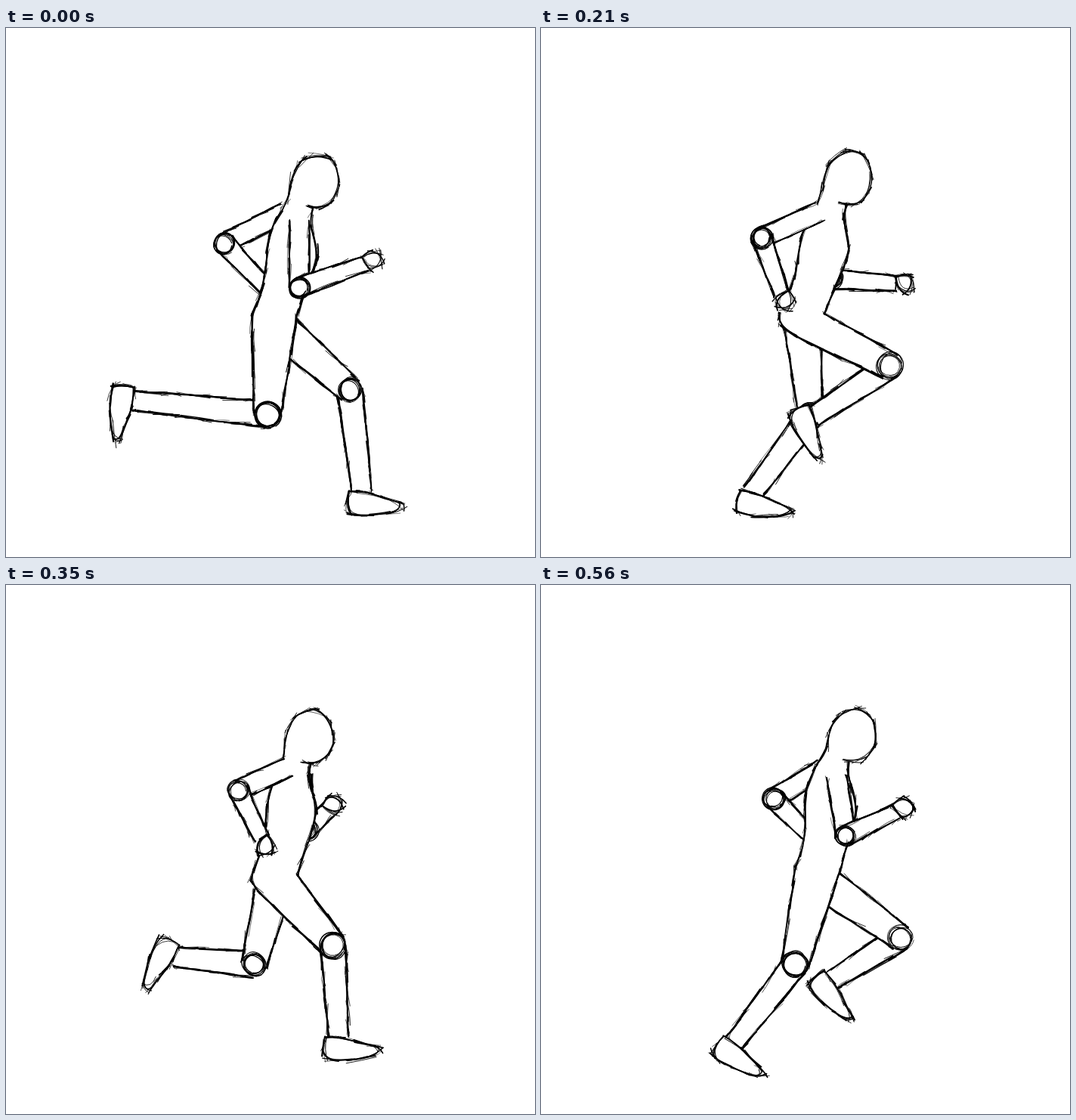
Recreate the animation shown at these times as an HTML page with a canvas. Size 700 by 700 pixels, loop 0.63 s.

```html
<!DOCTYPE html>
<html lang="en">
<head>
<meta charset="utf-8">
<title>Run cycle</title>
<style>
html, body { margin: 0; width: 100%; height: 100%; overflow: hidden; background: #fff; }
canvas { display: block; width: 700px; height: 700px; }
</style>
</head>
<body>
<canvas id="stage" width="700" height="700"></canvas>
<script>
const ctx = document.getElementById('stage').getContext('2d');
const HOLD = 70, STEPS = 9;

// Key poses: joint positions, and the tilt of each foot in degrees.
const keys = [
  { step: 0, head: [408, 200], hip: [355, 380],
    near: { elbow: [388, 343], hand: [486, 308], knee: [346, 511], ankle: [168, 493], foot: 90 },
    far: { elbow: [289, 285], hand: [360, 360], knee: [455, 479], ankle: [471, 614], foot: -2 } },
  { step: 2, head: [416, 198], hip: [346, 384],
    near: { elbow: [313, 316], hand: [357, 394], knee: [427, 497], ankle: [276, 481], foot: 84 },
    far: { elbow: [375, 335], hand: [419, 384], knee: [386, 500], ankle: [348, 613], foot: 2 } },
  { step: 3, head: [405, 195], hip: [345, 378],
    near: { elbow: [292, 278], hand: [322, 362], knee: [462, 447], ankle: [361, 514], foot: 60 },
    far: { elbow: [385, 332], hand: [481, 339], knee: [357, 512], ankle: [280, 615], foot: 5 } },
  { step: 4, head: [398, 193], hip: [358, 388],
    near: { elbow: [287, 240], hand: [298, 333], knee: [453, 466], ankle: [486, 586], foot: -10 },
    far: { elbow: [418, 320], hand: [454, 247], knee: [295, 507], ankle: [183, 542], foot: 95 } },
  { step: 6, head: [404, 202], hip: [353, 380],
    near: { elbow: [328, 303], hand: [387, 357], knee: [413, 488], ankle: [394, 612], foot: 2 },
    far: { elbow: [378, 328], hand: [413, 335], knee: [362, 497], ankle: [262, 442], foot: 123 } },
  { step: 8, head: [411, 196], hip: [366, 378],
    near: { elbow: [403, 332], hand: [480, 295], knee: [336, 502], ankle: [256, 606], foot: 27 },
    far: { elbow: [308, 283], hand: [365, 340], knee: [476, 467], ankle: [385, 523], foot: 43 } }
];

// Outlines around the origin, +x being the way the part points.
const headShape = [[-33, 22], [-31, 2], [-22, -19], [-8, -31], [8, -34], [22, -28], [30, -15],
  [32, 0], [34, 11], [27, 24], [18, 36], [8, 40], [-10, 36]];
const handShape = [[-12, -9], [-2, -14], [12, -11], [14, 3], [8, 13], [-8, 12], [-12, -9]];
const footShape = [[-17, -2], [-22, 26], [5, 31], [30, 29], [54, 26], [58, 18], [30, 10], [12, 2], [-17, -2]];

let seed = 1;
function rand(a, b) {
  seed = (Math.imul(seed, 1664525) + 1013904223) >>> 0;
  return a + (b - a) * seed / 4294967296;
}

function mix(a, b, t) {
  if (typeof a === 'number') return a + (b - a) * t;
  if (Array.isArray(a)) return a.map((v, i) => mix(v, b[i], t));
  return Object.fromEntries(Object.keys(a).map(k => [k, mix(a[k], b[k], t)]));
}
const add = (p, x, y) => [p[0] + x, p[1] + y];
const angle = (a, b) => Math.atan2(b[1] - a[1], b[0] - a[0]);

// Point at distance r to the side of a line that runs at angle a.
const aside = (p, a, r) => add(p, Math.sin(a) * r, -Math.cos(a) * r);

function place(shape, at, a) {
  const c = Math.cos(a), s = Math.sin(a);
  return shape.map(([x, y]) => add(at, x * c - y * s, x * s + y * c));
}

// Smooth curve through the given points, sampled about every 3 px.
function curve(pts) {
  const out = [];
  for (let i = 0; i < pts.length - 1; i++) {
    const b = pts[i], c = pts[i + 1];
    const a = pts[i - 1] || b, d = pts[i + 2] || c;
    const n = Math.max(2, Math.round(Math.hypot(c[0] - b[0], c[1] - b[1]) / 3));
    for (let k = 0; k < n; k++) {
      const t = k / n;
      out.push([0, 1].map(j => b[j] + 0.5 * t * (c[j] - a[j] +
        t * (2 * a[j] - 5 * b[j] + 4 * c[j] - d[j] + t * (3 * (b[j] - c[j]) + d[j] - a[j])))));
    }
  }
  out.push(pts[pts.length - 1]);
  return out;
}

// Covers a line with short overlapping pencil marks that stray up to `spread`.
function pass(line, spread, min, max) {
  for (let i = 0; i < line.length - 1;) {
    const count = Math.round(rand(5, 13));
    const from = Math.max(0, i - 2), to = Math.min(line.length - 1, i + count);
    const mid = line[(from + to) >> 1];
    const jitter = p => add(p, rand(-spread, spread), rand(-spread, spread));
    ctx.lineWidth = rand(min, max);
    ctx.beginPath();
    ctx.moveTo(...jitter(line[from]));
    ctx.quadraticCurveTo(...jitter(mid), ...jitter(line[to]));
    ctx.stroke();
    i += count;
  }
}

function sketch(pts, weight = 1) {
  const line = curve(pts);
  pass(line, 1, 1.4 * weight, 2.6 * weight);
  pass(line, 1.6, 1 * weight, 2 * weight);
  pass(line, 2.4, 0.6, 1.1);
  pass(line, 3.4, 0.5, 0.9);
}

function fill(pts) {
  ctx.beginPath();
  pts.forEach(p => ctx.lineTo(...p));
  ctx.fill();
}

function joint([x, y], r) {
  for (let i = 0; i < 7; i++) {
    ctx.lineWidth = rand(0.7, 1.5);
    ctx.beginPath();
    ctx.ellipse(x + rand(-1.5, 1.5), y + rand(-1.5, 1.5), r + rand(-3, 2), r + rand(-3, 2),
      rand(0, 3), 0, rand(5, 6.8));
    ctx.stroke();
  }
}

function limb(a, b, ra, rb) {
  const dir = angle(a, b);
  const front = [aside(a, dir, ra), aside(b, dir, rb)];
  const back = [aside(a, dir, -ra), aside(b, dir, -rb)];
  fill([...front, ...back.slice().reverse()]);
  sketch(front);
  sketch(back);
}

function part(shape, at, a) {
  const pts = place(shape, at, a);
  fill(curve(pts));
  sketch(pts, 0.9);
}

function arm({ elbow, hand }) {
  const shoulder = [375 + 0.2 * (elbow[0] - 320), 248 + 0.2 * (elbow[1] - 305)];
  const dir = angle(elbow, hand);
  limb(shoulder, elbow, 13, 13);
  limb(elbow, add(hand, -10 * Math.cos(dir), -10 * Math.sin(dir)), 13, 10);
  joint(elbow, 13);
  part(handShape, hand, dir);
}

function lowerLeg({ knee, ankle, foot }) {
  limb(knee, ankle, 17, 13);
  part(footShape, ankle, foot * Math.PI / 180);
}

// Head, trunk and the near thigh share one continuous outline.
function body({ head, hip, near: { knee } }) {
  const nape = [365, head[1] + 41];
  const throat = [405 + 0.5 * (head[0] - 405), head[1] + 38];
  const seat = add(hip, -30, 0), lap = add(hip, 30, 0);
  const dir = angle(hip, knee);
  const along = (a, b, t, bulge) => add(mix(a, b, t), bulge, 0);
  const back = [nape, along(nape, seat, 0.25, -7), along(nape, seat, 0.7, 4), seat,
    aside(hip, dir, -30), aside(knee, dir, -18)];
  const chest = [throat, along(throat, lap, 0.14, -1), along(throat, lap, 0.37, 14),
    along(throat, lap, 0.55, 14), along(throat, lap, 0.75, 7), lap];
  const thigh = [lap, aside(knee, dir, 18)];
  fill([...curve(back), ...thigh.slice().reverse(), ...curve(chest).reverse()]);
  sketch(back);
  sketch(chest);
  sketch(thigh);
  joint(knee, 16);
  sketch([nape, ...place(headShape, head, 0)], 0.75);
}

function draw(pose) {
  ctx.fillStyle = '#fff';
  ctx.fillRect(0, 0, 700, 700);
  ctx.strokeStyle = '#000';
  ctx.lineCap = ctx.lineJoin = 'round';
  arm(pose.far);
  lowerLeg(pose.far);
  limb(add(pose.hip, 0, 10), pose.far.knee, 24, 17);
  joint(pose.far.knee, 15);
  lowerLeg(pose.near);
  body(pose);
  arm(pose.near);
}

function poseAt(step) {
  const i = keys.findLastIndex(k => k.step <= step);
  const a = keys[i], b = keys[i + 1] || { ...keys[0], step: STEPS };
  return mix(a, b, (step - a.step) / (b.step - a.step));
}

let shown = -1;
function tick() {
  const step = Math.floor(performance.now() / HOLD) % STEPS;
  if (step !== shown) {
    shown = step;
    seed = 977 * (step + 1);
    draw(poseAt(step));
  }
  requestAnimationFrame(tick);
}
tick();
</script>
</body>
</html>
```
